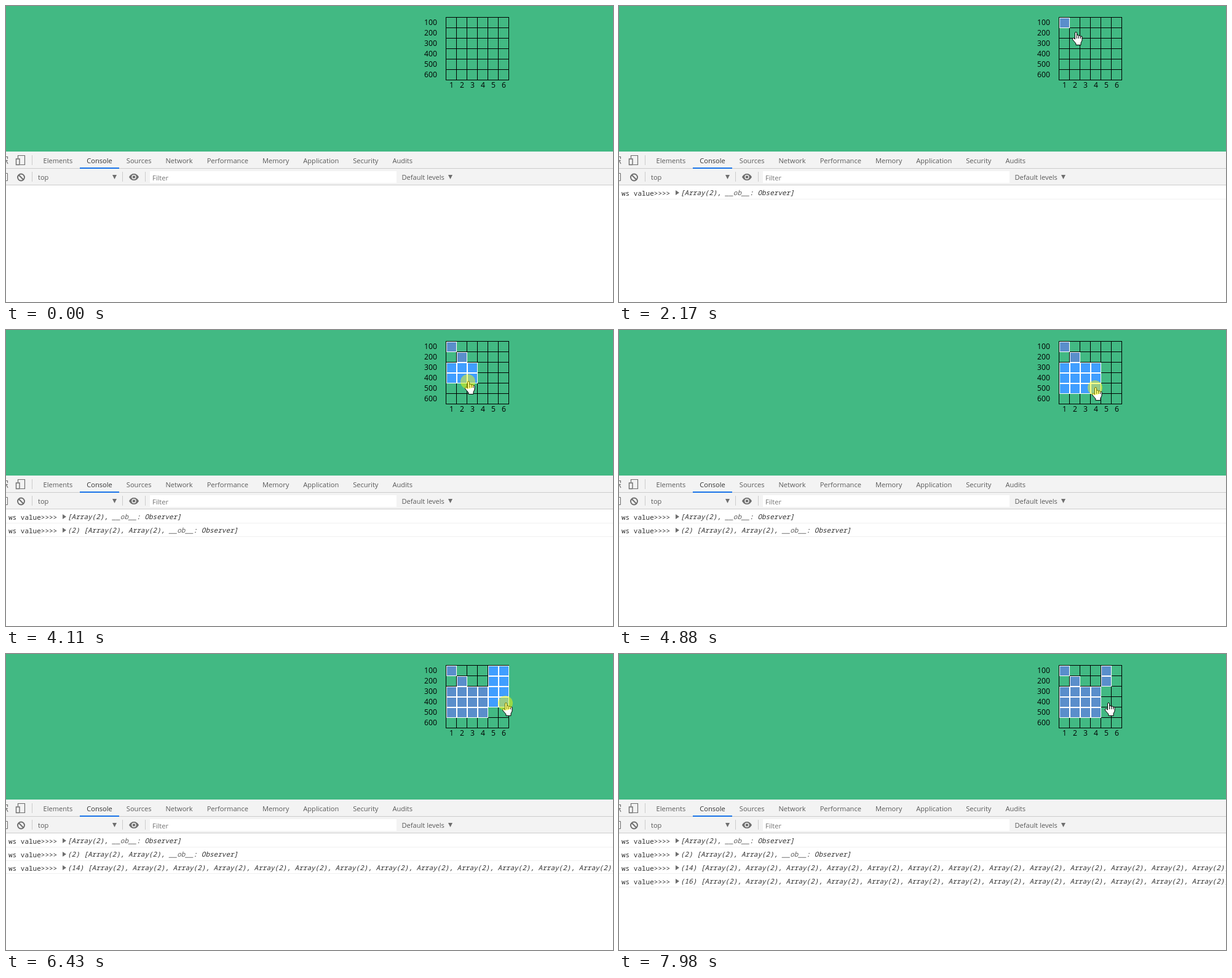
Write an HTML page with a canvas that moves like this. It is 987 px wide and 482 px high and loops after 8000 ms.

```html
<!DOCTYPE html>
<html lang="en">
<head>
<meta charset="utf-8">
<title>Grid selection</title>
<style>
html, body { margin: 0; width: 100%; height: 100%; overflow: hidden; background: #fff; }
canvas { display: block; }
</style>
</head>
<body>
<canvas id="stage" width="987" height="482"></canvas>
<script>
const ctx = document.getElementById('stage').getContext('2d');
const W = 987, H = 482, LOOP = 8000, STEP = 77;
const CELL = 17, GX = 715, GY = 18, SIZE = 6, SPAN = CELL * SIZE + 1;
const UI = '"Open Sans", "Noto Sans", sans-serif';
const MONO = '"Noto Sans Mono", "DejaVu Sans Mono", monospace';
const GRAY = '#6e6e6e', LINE = '#ccc', BAR = '#f3f3f3';

// Pointer moves: the pointer rests wherever the last one ended.
const start = { x: 917, y: 441 };
const moves = [
  { from: 150, to: 940, x: 738, y: 32 },
  { from: 940, to: 1180, x: 727, y: 30 },
  { from: 1560, to: 2010, x: 742, y: 43 },
  { from: 2870, to: 3100, x: 748, y: 54 },
  { from: 3100, to: 3480, x: 727, y: 63 },
  { from: 3800, to: 4110, x: 751, y: 84 },
  { from: 4110, to: 4260, x: 774, y: 94 },
  { from: 5350, to: 5660, x: 797, y: 54 },
  { from: 5660, to: 5970, x: 787, y: 29 },
  { from: 6050, to: 6430, x: 812, y: 80 },
  { from: 6585, to: 7120, x: 795, y: 43 },
  { from: 7590, to: 7980, x: 795, y: 80 }
];
const drags = [
  { down: 1410, up: 1490 },
  { down: 2330, up: 2480 },
  { down: 3800, up: 5200 },
  { down: 6050, up: 7510 }
];

const hand = new Path2D('M4.5 12V2Q4.5 .5 6 .5T7.5 2V6.5Q7.5 5 9 5T10.5 7Q10.5 6 12 6T13.5 8' +
  'Q13.5 7 15 7.2T16 9V14L14 18V21.5H6V19L.8 13Q0 11 1.2 10.2T4.5 12Z');
const knuckles = new Path2D('M7.5 6.5V11M10.5 7V11M13.5 8V11');
const arrow = new Path2D('M.5 .5V16.5L4 13L6.5 18.5L9 17.5L6.5 12H11.5Z');

function rect(x, y, w, h, color) {
  ctx.fillStyle = color;
  ctx.fillRect(x, y, w, h);
}

// Draws a string and returns its width.
function text(str, x, y, color, font, align = 'left') {
  ctx.font = font;
  ctx.fillStyle = color;
  ctx.textAlign = align;
  ctx.fillText(str, x, y);
  return ctx.measureText(str).width;
}

function fillPath(d, color) {
  ctx.fillStyle = color;
  ctx.fill(new Path2D(d));
}

function strokePath(d, color, width = 1) {
  ctx.strokeStyle = color;
  ctx.lineWidth = width;
  ctx.stroke(new Path2D(d));
}

// The pointer advances in even steps, like a low frame rate recording.
function pointerAt(t) {
  let { x, y } = start;
  for (const move of moves) {
    if (t < move.from) break;
    const length = move.to - move.from;
    const steps = Math.round(length / STEP);
    const p = Math.min(1, Math.floor((t - move.from) / length * steps + 1e-6) / steps);
    x += (move.x - x) * p;
    y += (move.y - y) * p;
  }
  return { x: Math.round(x), y: Math.round(y) };
}

function cellAt({ x, y }) {
  return [Math.floor((x - GX - 1) / CELL), Math.floor((y - GY - 1) / CELL)];
}

function cellsBetween([c0, r0], [c1, r1]) {
  const cells = [];
  for (let r = Math.min(r0, r1); r <= Math.max(r0, r1); r++)
    for (let c = Math.min(c0, c1); c <= Math.max(c0, c1); c++) cells.push([c, r]);
  return cells;
}

function paintCells(cells, color) {
  for (const [c, r] of cells) {
    const x = GX + 1 + c * CELL, y = GY + 1 + r * CELL;
    rect(x, y, CELL, CELL, '#fff');
    rect(x + 1, y + 1, CELL - 2, CELL - 2, color);
  }
}

function drawGrid() {
  rect(0, 0, W, 237, '#42b983');
  for (let i = 0; i <= SIZE; i++) {
    rect(GX + i * CELL, GY, 1, SPAN, '#000');
    rect(GX, GY + i * CELL, SPAN, 1, '#000');
  }
  const font = '12.2px ' + UI;
  for (let i = 0; i < SIZE; i++) {
    text((i + 1) * 100, 690.5, 31 + i * CELL, '#000', font, 'center');
    text(i + 1, 724.5 + i * CELL, 133, '#000', font, 'center');
  }
}

function drawTabs(font) {
  const names = ['Elements', 'Console', 'Sources', 'Network', 'Performance',
    'Memory', 'Application', 'Security', 'Audits'];
  let x = 60.5;
  for (const name of names) {
    const active = name === 'Console';
    const width = text(name, x, 256, active ? '#333' : '#5a5a5a', font);
    if (active) rect(Math.round(x - 11), 263, Math.round(width + 22), 2, '#1a73e8');
    x += width + 23;
  }
}

function drawIcons() {
  strokePath('M0 245.5H2.5V249M0 251L3 257M0 251.5H3', GRAY, 1.2);
  strokePath('M19.5 248V243.5H30.5V258.5H23', GRAY, 1.2);
  strokePath('M16.5 249H22V258.5H16.5Z', GRAY, 1.4);
  strokePath('M0 272.5H2.5V284.5H0', GRAY);
  strokePath('M30 279A5.5 5.5 0 1 1 19 279A5.5 5.5 0 1 1 30 279M20.6 275L28.4 283', GRAY, 1.9);
  fillPath('M200 278.5Q203 273 208 273T216 278.5Q213 284 208 284T200 278.5Z', GRAY);
  strokePath('M211 278.5A3 3 0 1 1 205 278.5A3 3 0 1 1 211 278.5', BAR, 1.4);
}

function drawToolbars() {
  const font = '11.1px ' + UI;
  rect(0, 237, W, 55, BAR);
  rect(0, 264, W, 1, LINE);
  rect(0, 291, W, 1, LINE);
  rect(42, 243, 1, 16, LINE);
  for (const x of [42, 189, 226]) rect(x, 270, 1, 16, LINE);
  drawTabs(font);
  drawIcons();

  rect(234, 269, 401, 19, '#fff');
  text('top', 52, 283, '#5a5a5a', font);
  text('Filter', 238, 284, '#757575', font);
  text('Default levels', 643.5, 283, '#5a5a5a', font);
  for (const x of [173, 719]) fillPath(`M${x} 275h7l-3.5 7z`, GRAY);
}

function drawLog(row, count) {
  const y = 308 + row * 22, dark = '#303030', font = 'italic 11px ' + MONO;
  text('ws value>>>>', 4, y + 1, dark, '11px ' + MONO);
  fillPath(`M92 ${y - 8}l6 4l-6 4z`, GRAY);
  const size = count > 1 ? `(${count}) ` : '';
  let x = 100;
  x += text(size + '[' + 'Array(2), '.repeat(count), x, y, dark, font);
  x += text('__ob__', x, y, '#5c5c5c', font);
  text(': Observer]', x, y, dark, font);
  rect(0, Math.round(314 + row * 21.7), W, 1, '#f0f0f0');
}

function drawPointer({ x, y }, pressed) {
  const overGrid = x > GX && x < GX + SPAN && y > GY && y < GY + SPAN;
  const shape = overGrid ? hand : arrow;
  ctx.save();
  ctx.translate(overGrid ? x - 5 : x, y - 1);
  ctx.fillStyle = '#fff';
  ctx.strokeStyle = '#000';
  ctx.lineWidth = 1;
  ctx.fill(shape);
  ctx.stroke(shape);
  if (overGrid) ctx.stroke(knuckles);
  ctx.restore();
  if (pressed) {
    ctx.fillStyle = 'rgba(255,255,0,.47)';
    ctx.beginPath();
    ctx.arc(x, y, 12, 0, 7);
    ctx.fill();
  }
}

function draw(t) {
  rect(0, 0, W, H, '#fff');
  drawGrid();
  drawToolbars();

  const selected = [];
  let pressed = false;
  drags.forEach(({ down, up }, row) => {
    if (t < down) return;
    const cells = cellsBetween(cellAt(pointerAt(down)), cellAt(pointerAt(Math.min(t, up))));
    if (t < up) {
      pressed = true;
      paintCells(cells, '#409eff');
    } else {
      selected.push(...cells);
      drawLog(row, selected.length);
    }
  });
  paintCells(selected, '#5a8ecb');
  if (t >= moves[0].from) drawPointer(pointerAt(t), pressed);
}

function tick() {
  draw(performance.now() % LOOP);
  requestAnimationFrame(tick);
}
tick();
</script>
</body>
</html>
```
